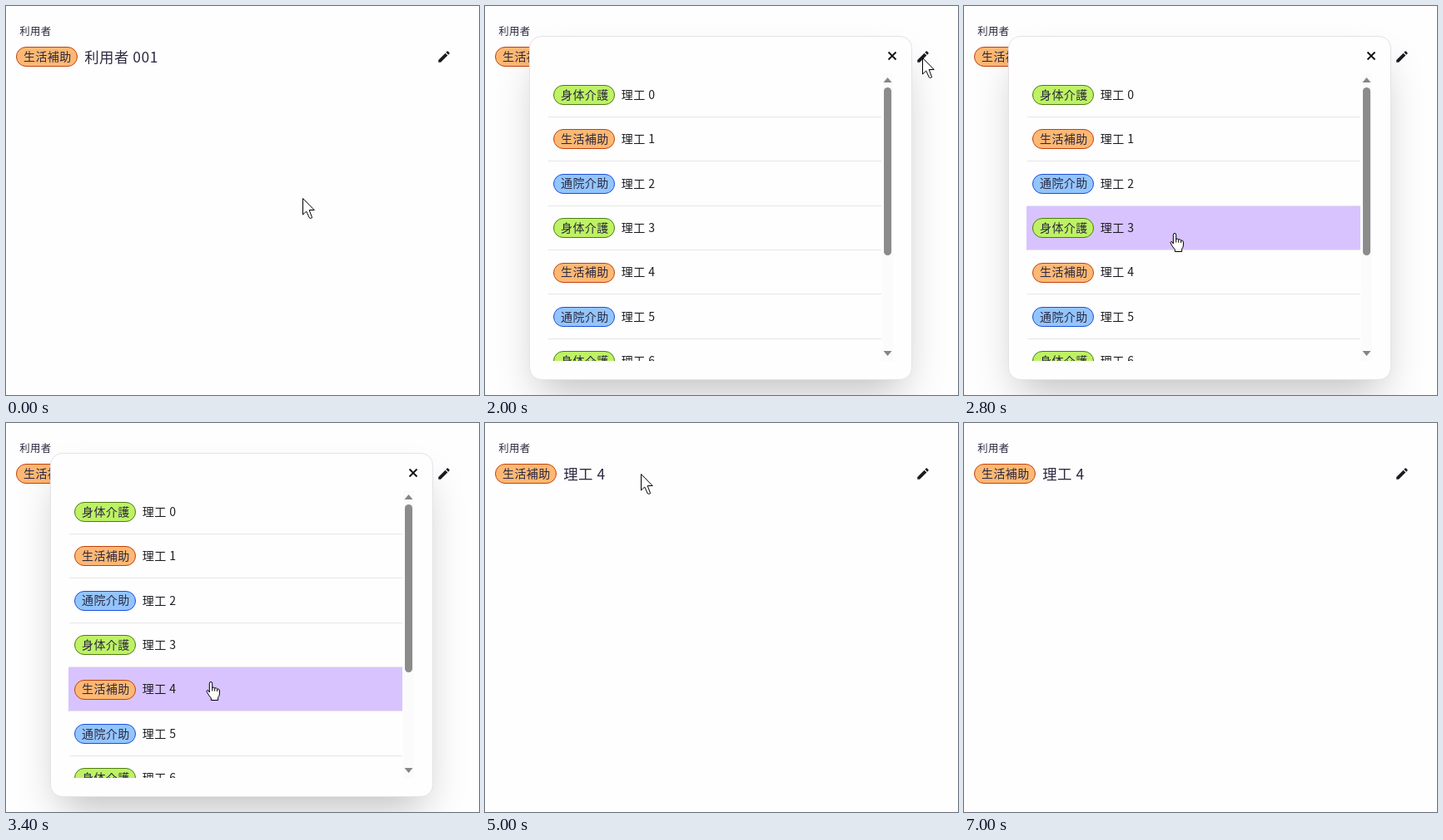
Animation of 568x468 px, one loop 7200 ms. Source, as an HTML page with a canvas:

```html
<!DOCTYPE html>
<html lang="ja">
<head>
<meta charset="utf-8">
<style>
html, body { margin: 0; width: 100%; height: 100%; overflow: hidden; background: #fefefe; }
canvas { display: block; }
</style>
</head>
<body>
<canvas id="stage" width="568" height="468"></canvas>
<script>
const ctx = document.getElementById('stage').getContext('2d');
const LOOP = 7200, STEP = 200;
const BG = '#fefefe', INK = '#2b2940', DARK = '#1b1b20';
const FONT = '"Noto Sans CJK JP", "Noto Sans CJK", sans-serif';
const ROW_H = 53.4, LIST_TOP = 80;
const OPEN_AT = 1800, CLOSE_AT = 3800;

const KINDS = [
  { name: '身体介護', fill: '#bef264', edge: '#4d7c0f' },
  { name: '生活補助', fill: '#fdb874', edge: '#c2410c' },
  { name: '通院介助', fill: '#93c5fd', edge: '#1d4ed8' }
];

// Pointer stops: time, shape, x, y
const STOPS = [
  [0, 'arrow', 356, 231], [200, 'arrow', 420, 212], [400, 'arrow', 481, 168],
  [600, 'arrow', 518, 95], [800, 'hand', 519, 63], [1200, 'hand', 519, 61],
  [1800, 'arrow', 525, 62], [2400, 'hand', 300, 206], [2600, 'hand', 249, 250],
  [2800, 'hand', 247, 273], [3000, 'hand', 245, 290], [3200, 'hand', 242, 304],
  [3400, 'hand', 240, 311], [4000, 'arrow', 244, 311], [4200, 'arrow', 240, 296],
  [4400, 'arrow', 225, 220], [4600, 'arrow', 203, 128], [4800, 'arrow', 187, 68],
  [5000, 'arrow', 187, 61], [5200, 'arrow', 173, 94], [5400, 'arrow', 162, 112],
  [6800, 'none', 0, 0]
];

const ARROW = new Path2D('M.5.5V20l4.2-4L8.4 24q1 1 3.2-.3L8.2 14.5h6z');
const HAND = new Path2D('M4.3 13V2.2Q4.3.5 6 .5t1.7 1.7V7.5Q9 6.3 10.8 7.9 ' +
  '12.2 7 13.6 8.9 16.3 8.6 16.4 11V15Q16.2 17.5 14.6 19.3V22.5H6.3V20' +
  'Q3.6 17 1.6 13.2.2 11 1.8 10.4 3.2 10.4 4.3 13z');
const KNUCKLES = new Path2D('M7.7 7v4.5M10.7 8v3.7M13.6 9v3');
const PENCIL = new Path2D('M3 17.25V21h3.75L17.81 9.94l-3.75-3.75L3 17.25z' +
  'M20.71 7.04c.39-.39.39-1.02 0-1.41l-2.34-2.34c-.39-.39-1.02-.39-1.41 0' +
  'l-1.83 1.83 3.75 3.75 1.83-1.83z');

function box(x, y, w, h, r, fill, edge) {
  ctx.beginPath();
  ctx.roundRect(x, y, w, h, r);
  ctx.fillStyle = fill;
  ctx.fill();
  if (edge) {
    ctx.strokeStyle = edge;
    ctx.lineWidth = 1;
    ctx.stroke();
  }
}

function text(str, x, y, size, color) {
  ctx.font = `350 ${size}px ${FONT}`;
  ctx.letterSpacing = size * .03 + 'px';
  ctx.fillStyle = color;
  ctx.fillText(str, x, y);
}

function chip(kind, x, mid) {
  const top = Math.round(mid - 11.6);
  box(x + .5, top + .5, 73, 23, 11.5, kind.fill, kind.edge);
  text(kind.name, x + 9, mid + 5.1, 14, INK);
}

function editButton(hover) {
  if (hover) box(505, 47, 42, 29, 7, '#d4d1da');
  ctx.save();
  ctx.translate(517, 52);
  ctx.scale(.75, .75);
  ctx.fillStyle = DARK;
  ctx.fill(PENCIL);
  if (hover) {
    ctx.beginPath();
    ctx.rect(6, 7, 9, 11);
    ctx.clip();
    ctx.fillStyle = '#b8402a';
    ctx.fill(PENCIL);
  }
  ctx.restore();
}

function page(label, hover) {
  ctx.fillStyle = BG;
  ctx.fillRect(0, 0, 568, 468);
  text('利用者', 16.2, 35.2, 12.4, INK);
  chip(KINDS[1], 12, 61);
  text(label, 94.2, 67.6, 17.4, INK);
  editButton(hover);
}

function triangle(x, y, dir) {
  ctx.beginPath();
  ctx.moveTo(x - 5, y + 3 * dir);
  ctx.lineTo(x, y - 3 * dir);
  ctx.lineTo(x + 5, y + 3 * dir);
  ctx.fillStyle = '#858585';
  ctx.fill();
}

function list(active) {
  ctx.save();
  ctx.beginPath();
  ctx.rect(75, LIST_TOP, 402, 427 - LIST_TOP);
  ctx.clip();
  for (let i = 0; i < 7; i++) {
    const mid = 106.5 + i * ROW_H, line = Math.round(mid + 26.3);
    if (i === active) {
      const top = Math.round(mid - 27);
      ctx.fillStyle = '#d8c3ff';
      ctx.fillRect(75, top + 1, 401, line - top);
    }
    ctx.fillStyle = '#e7e5e8';
    ctx.fillRect(76, line, 400, 1);
    chip(KINDS[i % 3], 82, mid);
    text('理工 ' + i, 163.8, mid + 5.2, 14, DARK);
  }
  ctx.restore();
}

function modal(active, alpha) {
  ctx.save();
  ctx.globalAlpha = alpha;
  ctx.shadowColor = 'rgba(0,0,0,.25)';
  ctx.shadowBlur = 50;
  ctx.shadowOffsetY = 25;
  box(65, 49, 436, 389, 8, BG);
  ctx.shadowColor = 'transparent';
  box(53.5, 36.5, 459, 413, 14, BG, '#e6e1e8');

  ctx.beginPath();
  ctx.moveTo(484.5, 55.5);
  ctx.lineTo(493.5, 64.5);
  ctx.moveTo(493.5, 55.5);
  ctx.lineTo(484.5, 64.5);
  ctx.strokeStyle = '#111';
  ctx.lineWidth = 1.8;
  ctx.stroke();

  list(active);
  box(477, 81, 13, 346, 0, '#fcfbfc');
  box(479, 98, 9, 202, 4.5, '#8b8b8b');
  triangle(483.5, 89, 1);
  triangle(483.5, 418, -1);
  ctx.restore();
}

function pointer([, shape, x, y]) {
  if (shape === 'none') return;
  const path = shape === 'hand' ? HAND : ARROW;
  ctx.save();
  ctx.translate(x, y);
  ctx.fillStyle = '#fff';
  ctx.strokeStyle = '#000';
  ctx.lineWidth = 1;
  ctx.lineJoin = 'round';
  ctx.fill(path);
  ctx.stroke(path);
  if (shape === 'hand') ctx.stroke(KNUCKLES);
  ctx.restore();
}

function activeRow(t) {
  if (t < 2400) return -1;
  return t < 2800 ? 2 : t < 3200 ? 3 : 4;
}

function draw(now) {
  const t = Math.floor(now % LOOP / STEP) * STEP;
  page(t < CLOSE_AT ? '利用者 001' : '理工 4', t >= 800 && t < OPEN_AT);
  if (t >= OPEN_AT && t <= CLOSE_AT) {
    modal(activeRow(t), t === OPEN_AT || t === CLOSE_AT ? .6 : 1);
  }
  pointer(STOPS.findLast(s => s[0] <= t));
}

const start = performance.now();
function tick() {
  draw(performance.now() - start);
  requestAnimationFrame(tick);
}
tick();
</script>
</body>
</html>
```
